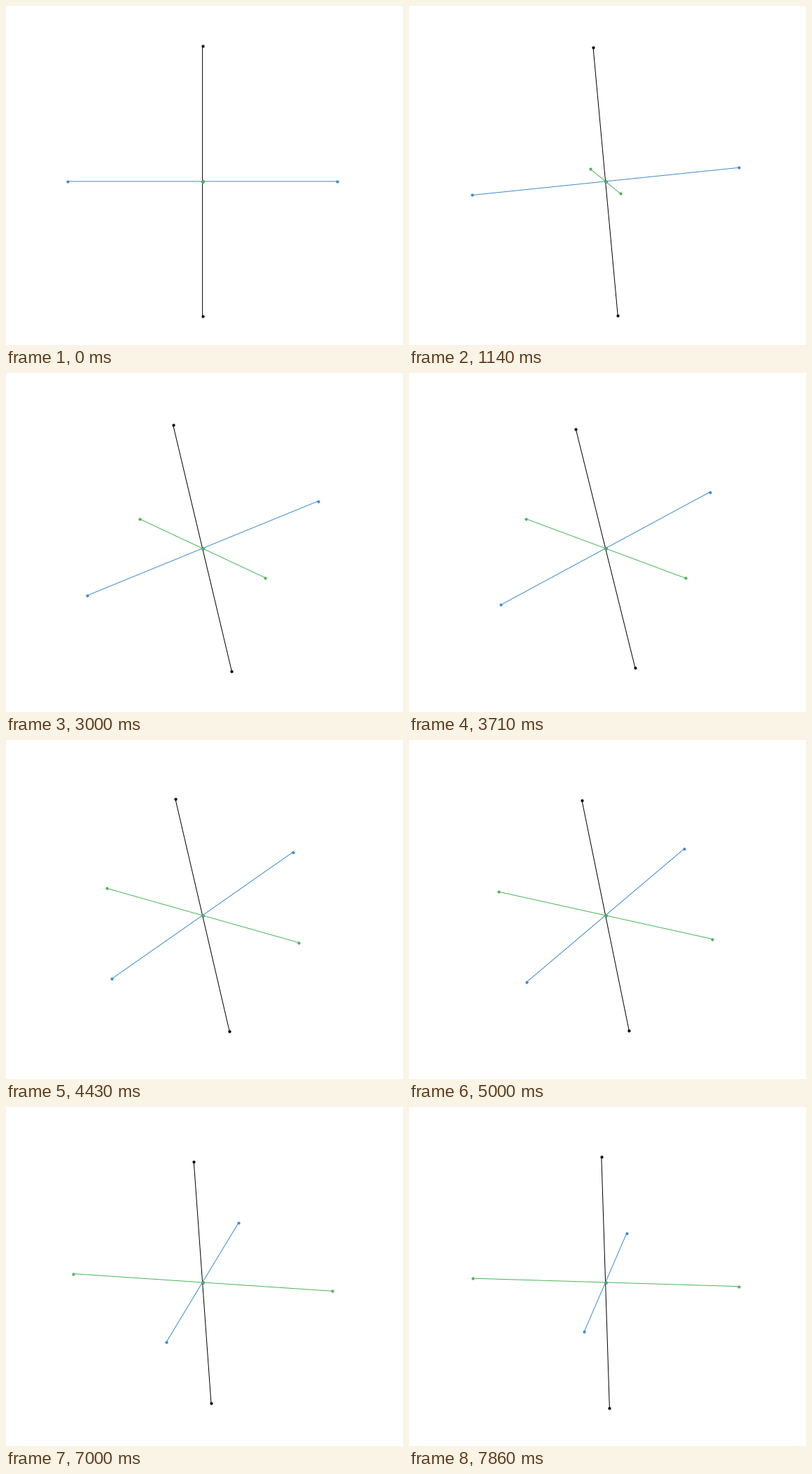
A matplotlib script for the animation above (8000 ms loop, 567 px wide and 483 px high).

```python
import numpy as np
import matplotlib.pyplot as plt
from matplotlib.animation import FuncAnimation

W, H, DPI = 567, 483, 64
PX = 72 / DPI                      # points per pixel
CX, CY, R = 280.6, 249.9, 192.5
LOOP, TICK, RATE = 8000, 20, 7     # ms, ms, poses per second

# turn angle in degrees, keyed on the pose number
KEYS = [3.4, 8, 16, 26, 35, 43, 55]
TURN = [0, 5.87, 16.05, 28.3, 40.17, 50.93, 66.6]

fig = plt.figure(figsize=(W / DPI, H / DPI), dpi=DPI, facecolor="white")
ax = fig.add_axes([0, 0, 1, 1])
ax.set_xlim(0, W)
ax.set_ylim(H, 0)
ax.axis("off")


def rod(color):
    line, = ax.plot([], [], color=color, lw=1.0 * PX, marker="o",
                    ms=4.2 * PX, mew=0, solid_capstyle="butt")
    line.set_snap(False)
    return line


rods = [rod(c) for c in ("#000000", "#428bca", "#4cb55a")]


def project(deg):
    """Screen directions of the three axes, turned equally about x, y and z."""
    s, c = np.sin(np.radians(deg)), np.cos(np.radians(deg))
    lean = s * s * c - s * c
    return [(lean, c * c + s ** 3),
            (c * c, s * c),
            (s * s + s * c * c, lean)]


def draw(i):
    pose = int((i * TICK + 15) * RATE / 1000)
    ends = np.array([-1, 0, 1]) * R
    for line, (x, y) in zip(rods, project(np.interp(pose, KEYS, TURN))):
        line.set_data(CX + ends * x, CY - ends * y)
    return rods


anim = FuncAnimation(fig, draw, frames=LOOP // TICK, interval=TICK,
                     init_func=lambda: draw(0), repeat=True, repeat_delay=0)
plt.show()
```
